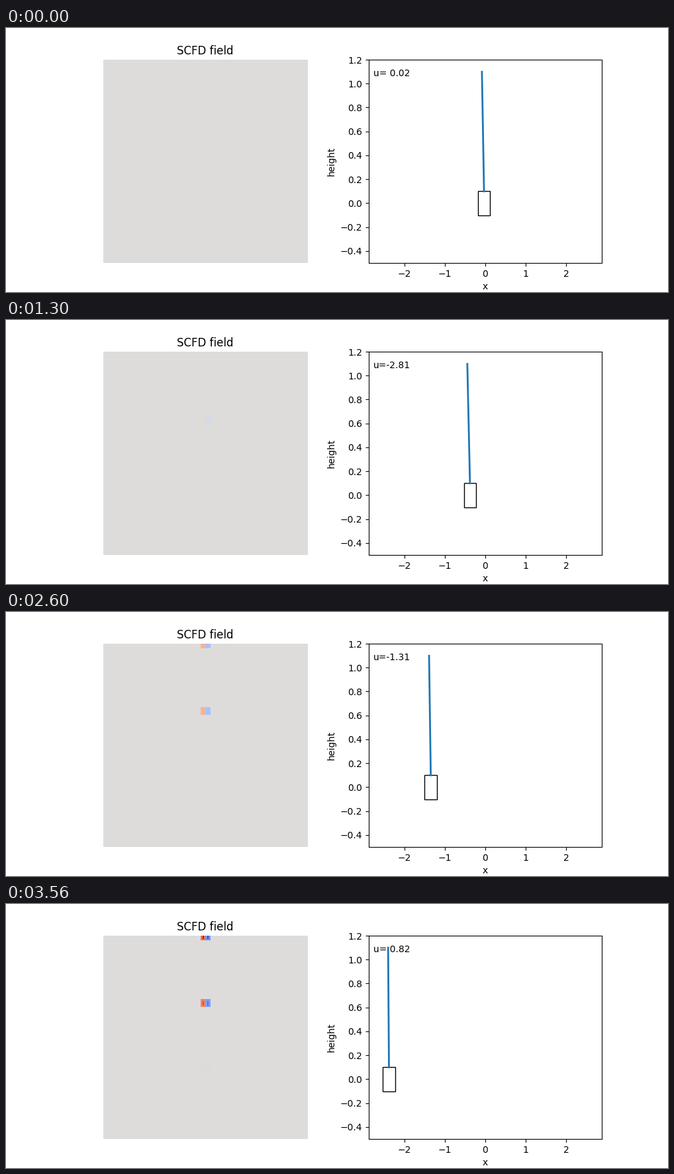
Recreate the animation shown at these times as a matplotlib script. Size 1000 px wide and 400 px high, loop 3.58 s.

```python
import numpy as np
import matplotlib.pyplot as plt
from matplotlib.animation import FuncAnimation
from matplotlib.patches import Rectangle

FRAMES, STEP_MS = 179, 20
END = (FRAMES - 1) * STEP_MS / 1000
GRID, MID = 128, 64
CART_W, CART_H = 0.3, 0.2

# Key poses: time in s, cart position, pole angle, control force.
KEY_T, *KEY_POSES = np.transpose([
    (0.00, -0.029, -0.052, 0.02),
    (0.30, -0.054, -0.047, 0.60),
    (0.92, -0.202, -0.069, -2.96),
    (1.70, -0.619, -0.056, -1.93),
    (2.22, -1.012, -0.045, -1.62),
    (2.96, -1.698, -0.038, -0.80),
    (END, -2.377, -0.021, 0.82),
])


def glide(t, values):
    """Cubic Hermite curve through the key values."""
    slope = np.gradient(values, KEY_T)
    i = np.clip(np.searchsorted(KEY_T, t, side="right") - 1, 0, len(KEY_T) - 2)
    h = KEY_T[i + 1] - KEY_T[i]
    s = (t - KEY_T[i]) / h
    return ((1 + 2 * s) * (1 - s) ** 2 * values[i]
            + s * (1 - s) ** 2 * h * slope[i]
            + s * s * (3 - 2 * s) * values[i + 1]
            + s * s * (s - 1) * h * slope[i + 1])


def growth(t, start, peak, power):
    """Rise from zero at start to peak at the end of the loop."""
    return peak * max(0, (t - start) / (END - start)) ** power


def add_pair(field, row, amp):
    """Positive and negative patch side by side, with rims that lag as it grows."""
    rim = amp * (1 - 0.35 * amp)
    top = max(row - 2, 0)
    inner = slice(max(row - 1, 0), row + 2)
    for left, sign in ((MID - 3, 1), (MID, -1)):
        field[top:row + 3, left:left + 3] = sign * rim
        field[inner, left + 1] = sign * amp


def field_at(t):
    field = np.zeros((GRID, GRID))
    add_pair(field, 0, growth(t, 0.9, 0.98, 2))
    add_pair(field, GRID // 3, growth(t, 0.4, 0.82, 2))
    add_pair(field, 2 * (GRID // 3), growth(t, 0.9, 0.045, 1))
    return field


fig, (ax_field, ax_cart) = plt.subplots(1, 2, figsize=(10, 4), dpi=100)

image = ax_field.imshow(field_at(0), cmap="coolwarm", vmin=-1, vmax=1,
                        interpolation="nearest")
ax_field.set_title("SCFD field")
ax_field.axis("off")

ax_cart.set_xlim(-2.88, 2.88)
ax_cart.set_ylim(-0.5, 1.2)
ax_cart.set_xlabel("x")
ax_cart.set_ylabel("height")
cart = ax_cart.add_patch(Rectangle((0, -CART_H / 2), CART_W, CART_H, fill=False))
pole, = ax_cart.plot([], [], lw=2)
label = ax_cart.text(0.02, 0.92, "", transform=ax_cart.transAxes)


def update(n):
    t = n * STEP_MS / 1000
    x, angle, force = (glide(t, values) for values in KEY_POSES)
    base = CART_H / 2
    image.set_data(field_at(t))
    cart.set_x(x - CART_W / 2)
    pole.set_data([x, x + np.sin(angle)], [base, base + np.cos(angle)])
    label.set_text(f"u={force: .2f}")
    return image, cart, pole, label


anim = FuncAnimation(fig, update, frames=FRAMES, interval=STEP_MS,
                     repeat=True, repeat_delay=0, blit=False)
plt.show()
```
